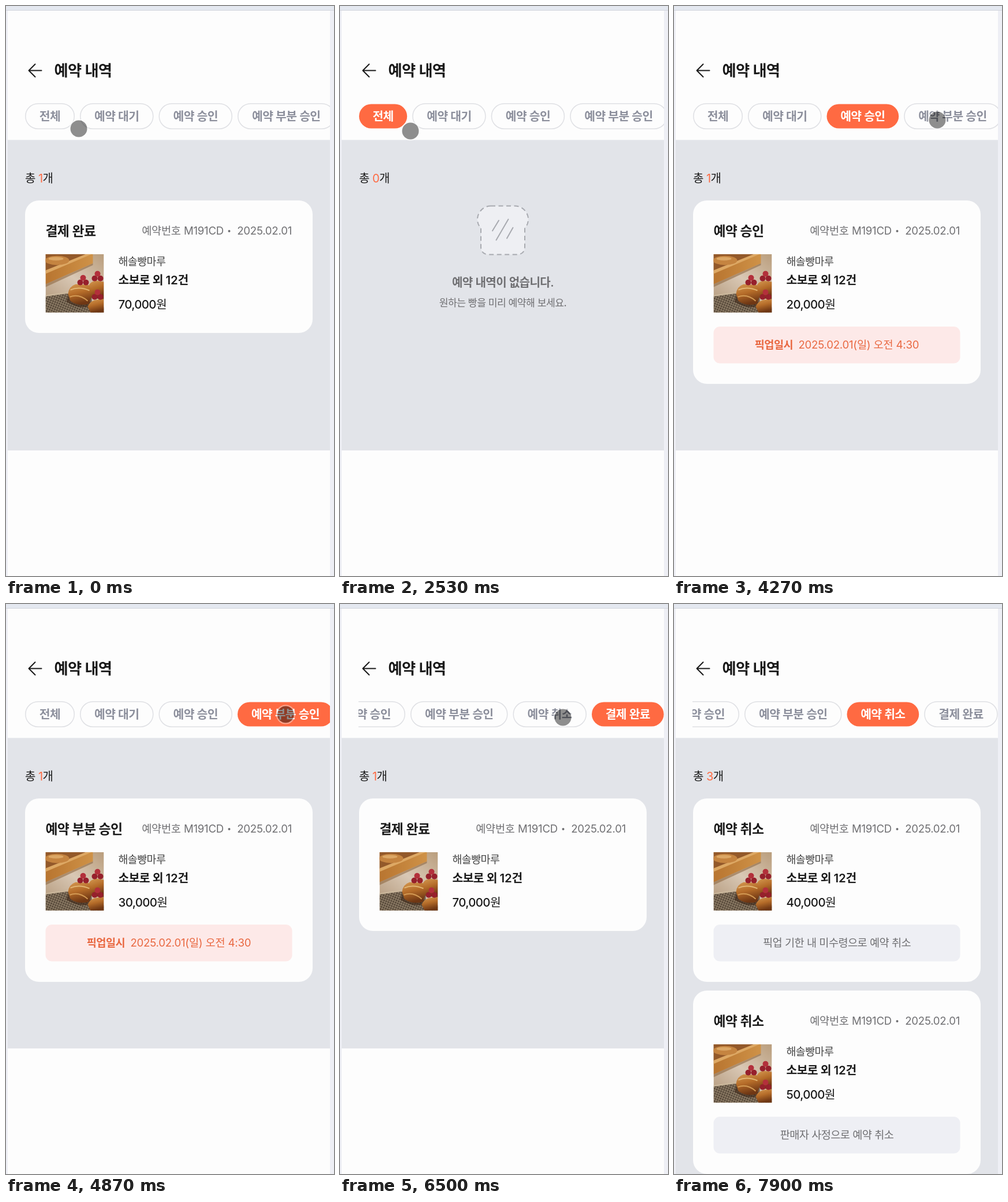
Recreate the animation shown at these times as an HTML page. Size 568 by 985 pixels, loop 7.93 s.

```html
<!DOCTYPE html>
<html lang="ko">
<head>
<meta charset="utf-8">
<title>예약 내역</title>
<style>
  html, body { margin: 0; width: 100%; height: 100%; overflow: hidden; background: #eeeff5; }
  svg { display: block; }
  text {
    font-family: Inter, "Noto Sans CJK KR", "Noto Sans CJK", sans-serif;
    letter-spacing: -.03em; word-spacing: .01em; fill: #1a1a1a; white-space: pre;
  }
  .num { letter-spacing: -.012em; }
  .b { font-weight: 600; }
  .mid { text-anchor: middle; }
  .end { text-anchor: end; }
  .hot { fill: #ff6a42; }
  .chip { fill: #fdfdfd; stroke: #dfe0e4; stroke-width: 1.5; }
  .tab { fill: #8c8f9c; }
  .on { fill: #fff; }
  .meta { fill: #6f6f72; }
</style>
</head>
<body>
<svg id="stage" width="568" height="985" viewBox="0 0 568 985">
  <defs>
    <clipPath id="strip"><rect x="32.5" y="160" width="528.5" height="60"/></clipPath>
    <clipPath id="square"><rect width="101" height="101"/></clipPath>
    <linearGradient id="table" x1="1" x2=".2" y2="1">
      <stop offset="0" stop-color="#b99d7c"/><stop offset=".5" stop-color="#d9c8b5"/><stop offset="1" stop-color="#b59b7e"/>
    </linearGradient>
    <linearGradient id="wood" x2="1">
      <stop offset="0" stop-color="#b87530"/><stop offset="1" stop-color="#cf9247"/>
    </linearGradient>
    <linearGradient id="crust" x2=".3" y2="1">
      <stop offset="0" stop-color="#d59a52"/><stop offset=".5" stop-color="#b56c29"/><stop offset="1" stop-color="#6f3714"/>
    </linearGradient>
    <pattern id="mesh" width="4" height="4" patternUnits="userSpaceOnUse" patternTransform="rotate(22)">
      <rect width="4" height="4" fill="#57493a"/><path d="M0 .5H4M.5 0V4" stroke="#95846d"/>
    </pattern>
    <g id="berries" fill="#96202c">
      <circle cx="-5" cy="4" r="5"/><circle cx="5" cy="4" r="5"/><circle cy="-4" r="5" fill="#b3303b"/>
    </g>
    <g id="photo" clip-path="url(#square)">
      <rect width="101" height="101" fill="url(#table)"/>
      <path d="M0 0H82V16L0 52Z" fill="url(#wood)"/>
      <path d="M0 0H70L0 29Z" fill="#93592a"/>
      <path d="M0 28L70 0H80L0 34Z" fill="#dda864"/>
      <path d="M0 52L82 16V19L0 57Z" fill="#8f6a44" opacity=".6"/>
      <ellipse cx="20" cy="11" rx="21" ry="8" fill="#c58440"/>
      <ellipse cx="18" cy="8" rx="13" ry="3" fill="#dca765"/>
      <path d="M0 73L40 68L101 92V101H0Z" fill="url(#mesh)"/>
      <path d="M0 72L40 66" stroke="#cbb89c" stroke-width="2"/>
      <path d="M36 82Q56 96 80 90V70H40Z" fill="#40291a" opacity=".65"/>
      <path d="M74 57Q76 47 88 46L101 48V78L80 76Z" fill="url(#crust)"/>
      <path d="M39 69Q40 56 52 52L74 53Q82 59 80 72L75 86Q57 91 43 81Z" fill="url(#crust)"/>
      <path d="M43 62Q58 55 76 63" fill="none" stroke="#e2b673" stroke-width="2"/>
      <path d="M42 74Q58 68 73 81" fill="none" stroke="#d39a54" stroke-width="2"/>
      <path d="M73 91Q77 77 101 78V101H78Z" fill="url(#crust)"/>
      <use href="#berries" x="65" y="45"/>
      <use href="#berries" x="90" y="38"/>
      <use href="#berries" x="90" y="70"/>
    </g>
    <g id="bread">
      <path d="M261 345.500H303C317 345.500 326 358 326 368C326 375 324 380 320 383V416Q320 429.500 306 429.500H258Q244 429.500 244 416V383C240 380 238 375 238 368C238 358 247 345.500 261 345.500Z"
        fill="#eeeff3" stroke="#a8aab0" stroke-width="2" stroke-dasharray="8 5.500"/>
      <path d="M275 370.500L264 388.500M291.500 368.500L270.500 404.500M299.500 383L289 401.500" stroke="#a8aab0" stroke-width="2" stroke-linecap="round"/>
    </g>
  </defs>

  <rect width="568" height="7" fill="#e4e8f0"/>
  <rect y="7" width="568" height="1" fill="#d2d5dc"/>
  <rect x="3" y="8" width="558" height="977" fill="#fdfdfd"/>
  <path d="M61.500 111.500H40M50.500 100.500L39.500 111.500L50.500 122.500" fill="none" stroke="#1a1a1a" stroke-width="2" stroke-linecap="round" stroke-linejoin="round"/>
  <text class="b" x="83.500" y="120.500" font-size="26.300">예약 내역</text>
  <rect x="3" y="231.500" width="558" height="536.500" fill="#e2e4e9"/>
  <g id="views"></g>
  <g clip-path="url(#strip)"><g id="tabs"></g></g>
  <g id="pointer">
    <circle r="15.500" fill="none" stroke="#fff" stroke-opacity=".45" stroke-width="2"/>
    <circle r="14.500" fill="#000" fill-opacity=".44"/>
  </g>
</svg>
<script>
const LOOP = 7930;
const $ = id => document.getElementById(id);
const TABS = [['전체', 86], ['예약 대기', 127.5], ['예약 승인', 127.5],
  ['예약 부분 승인', 168.5], ['예약 취소', 127.5], ['결제 완료', 127.5]];
const PICKUP = 'pickup';

// Order: status tab, price, note
const pending = [1, '10,000'];
const approved = [2, '20,000', PICKUP];
const partial = [3, '30,000', PICKUP];
const expired = [4, '40,000', '픽업 기한 내 미수령으로 예약 취소'];
const refused = [4, '50,000', '판매자 사정으로 예약 취소'];
const paid = [5, '70,000'];

// Visit: tab, time of click, time of loading, count, visible orders
const VISITS = [
  [5, 0, 0, 1, [paid]],
  [0, 900, 2650, 7, [pending, approved, partial]],
  [1, 3320, 3650, 1, [pending]],
  [2, 3950, 4120, 1, [approved]],
  [3, 4550, 4750, 1, [partial]],
  [5, 6250, 6400, 1, [paid]],
  [4, 6560, 6800, 3, [expired, refused]],
];

const text = (x, y, size, body, cls = '', extra = '') =>
  `<text x="${x}" y="${y}" font-size="${size}" class="${cls}" ${extra}>${body}</text>`;

function tabStrip(active) {
  let x = 33;
  return TABS.map(([label, full], i) => {
    const on = i === active, w = on ? full - 2.8 : full;
    const box = on
      ? `<rect class="hot" x="${x}" y="169.500" width="${w}" height="42" rx="21"/>`
      : `<rect class="chip" x="${x + .75}" y="168.750" width="${w - 1.5}" height="43.500" rx="21.750"/>`;
    const out = box + text(x + w / 2, 198, 20.4, label, 'b mid ' + (on ? 'on' : 'tab'));
    x += w + 9;
    return out;
  }).join('');
}

const total = n => text(33, 305, 20, `총 <tspan class="hot">${n}</tspan>개`);

function empty(icon) {
  const dy = icon ? 0 : 2;
  return total(0) + (icon ? '<use href="#bread"/>' : '') +
    text(282, 484.5 + dy, 20.1, '예약 내역이 없습니다.', 'b mid meta') +
    text(282, 519.3 + dy, 17.2, '원하는 빵을 미리 예약해 보세요.', 'mid meta', 'font-weight="500"');
}

function noteBox(note) {
  const pickup = note === PICKUP;
  const body = pickup
    ? '<tspan class="b">픽업일시</tspan><tspan class="num" dx="9.500">2025.02.01(일) 오전 4:30</tspan>' : note;
  return `<rect x="68.500" y="554" width="427" height="63.500" rx="11" fill="${pickup ? '#fde9e8' : '#eeeff4'}"/>` +
    text(282, 592, 18.6, body, 'mid meta', pickup ? 'style="fill:#e96841"' : '');
}

function card([status, price, note], y) {
  return `<g transform="translate(0 ${y - 336})">
    <rect x="33" y="336" width="498" height="${note ? 317 : 229}" rx="24" fill="#fdfdfd"/>
    ${text(68.5, 396.5, 22.9, TABS[status][0], 'b')}
    ${text(377, 394.8, 18.6, '예약번호 M191CD', 'num end meta')}
    <circle class="meta" cx="386.500" cy="389" r="2"/>
    ${text(495, 394.8, 18.6, '2025.02.01', 'num end meta')}
    <use href="#photo" x="68.500" y="428.700"/>
    ${text(194.5, 447.8, 18.4, '해솔빵마루', '', 'style="fill:#444"')}
    ${text(194.5, 481.3, 20.4, '소보로 외 <tspan class="num">12</tspan>건', 'b')}
    ${text(194.5, 523, 20.4, price + '원', '', 'font-weight="500"')}
    ${note ? noteBox(note) : ''}</g>`;
}

function list(count, orders) {
  let y = 336;
  const cards = orders.map(order => {
    const out = card(order, y);
    y += order[2] ? 332 : 244;
    return out;
  }).join('');
  const long = count > 1 ? '<rect x="3" y="760" width="558" height="225" fill="#e2e4e9"/>' : '';
  return long + total(count) + cards;
}

// Adds a group that is visible only from a to b
function show(parent, markup, a, b) {
  if (a >= b) return;
  const g = document.createElementNS('http://www.w3.org/2000/svg', 'g');
  g.innerHTML = markup;
  parent.append(g);
  const key = (t, opacity) => ({ offset: t / LOOP, opacity, easing: 'step-end' });
  const keys = [key(a, 1), key(b, b === LOOP ? 1 : 0)];
  if (a > 0) keys.unshift(key(0, 0));
  if (b < LOOP) keys.push(key(LOOP, 0));
  g.animate(keys, { duration: LOOP, iterations: Infinity });
}

function move(el, path) {
  const keys = path.map(([t, x, y]) =>
    ({ offset: t / LOOP, transform: `translate(${x}px, ${y}px)`, easing: 'ease-in-out' }));
  el.animate(keys, { duration: LOOP, iterations: Infinity });
}

VISITS.forEach(([tab, click, loaded, count, orders], i) => {
  const end = i + 1 < VISITS.length ? VISITS[i + 1][1] : LOOP;
  const icon = Math.min(click + 140, loaded);
  show($('tabs'), tabStrip(tab), click, end);
  show($('views'), empty(false), click, icon);
  show($('views'), empty(true), icon, loaded);
  show($('views'), list(count, orders), loaded, end);
});

move($('tabs'), [[0, 0, 0], [5050, 0, 0], [5500, -101, 0], [5750, -101, 0],
  [6080, -279, 0], [LOOP, -279, 0]]);

move($('pointer'), [[0, 126, 212], [350, 122, 209], [800, 88, 201], [950, 86, 201],
  [1270, 122, 216], [2900, 122, 216], [3250, 172, 201], [3400, 174, 202], [3650, 176, 201],
  [3880, 322, 197], [4000, 328, 196], [4270, 456, 197], [4600, 478, 194], [5000, 486, 190],
  [5630, 481, 186], [6080, 488, 191], [6290, 490, 193], [6500, 386, 196], [6600, 376, 196],
  [6850, 378, 195], [7200, 590, 26], [LOOP, 590, 26]]);
</script>
</body>
</html>
```
